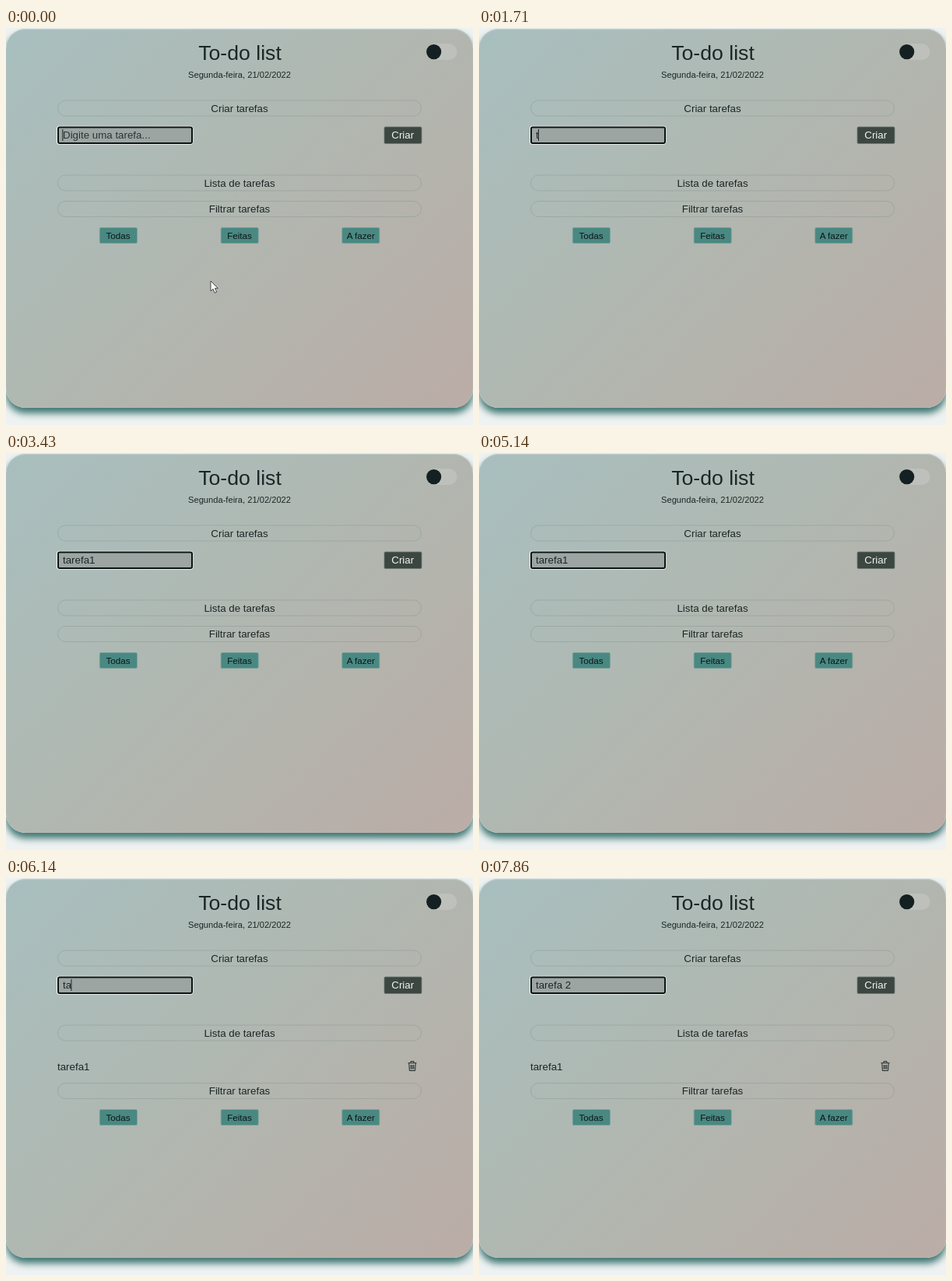
Recreate the animation shown at these times as an HTML page. Size 600 by 510 pixels, loop 8000 ms.

```html
<!DOCTYPE html>
<html lang="pt">
<head>
<meta charset="utf-8">
<title>To-do list</title>
<style>
  html, body { margin: 0; width: 100%; height: 100%; overflow: hidden; background: #eef2f2; }
  .card {
    position: absolute; left: 0; top: 1px; width: 600px; height: 487px; border-radius: 25px;
    background: linear-gradient(135deg, #a8bfbf 0%, #b1b7b0 50%, #bbaca6 100%);
    box-shadow: 0 7px 10px #3d7571, inset 0 1px 1px #c3d2d1;
  }
  svg { position: absolute; left: 0; top: 0; }
  text { font: 13.333px "Liberation Sans", Arial, sans-serif; fill: #1c2626; white-space: pre; }
  .mid { text-anchor: middle; }
  .pill { fill: none; stroke: #788784; stroke-opacity: .34; }
  .filter rect { fill: #4a8882; stroke: #75a09b; stroke-width: .8; }
  .filter text { font-size: 11.667px; fill: #0b1717; }
</style>
</head>
<body>
<div class="card"></div>
<svg width="600" height="510" viewBox="0 0 600 510">
  <text class="mid" x="300.5" y="41" style="font-size:26.667px">To-do list</text>
  <text class="mid" x="300" y="64" style="font-size:11.15px">Segunda-feira, 21/02/2022</text>

  <rect x="540" y="20" width="39.5" height="21" rx="10.5" fill="#bec0bb"/>
  <circle cx="549.7" cy="30.6" r="9.6" fill="#142022"/>

  <rect class="pill" x="66.5" y="93" width="467" height="20" rx="10"/>
  <text class="mid" x="300" y="107.5">Criar tarefas</text>

  <rect x="65" y="125.7" width="175.5" height="24" rx="3.5" fill="#f4f6f6"/>
  <rect x="67" y="127.5" width="172" height="20.5" rx="2" fill="#9ca5a2" stroke="#0d1414" stroke-width="2"/>
  <text id="field" x="73" y="142"></text>
  <rect id="caret" y="130" width="1" height="15" fill="#1c2626"/>
  <rect x="486" y="127" width="48" height="21.5" rx="1.5" fill="#3c4742" stroke="#6e7c77" stroke-width=".8"/>
  <text class="mid" x="509.7" y="142" style="fill:#f0f2f1">Criar</text>

  <rect class="pill" x="66.5" y="189" width="467" height="20" rx="10"/>
  <text class="mid" x="300" y="203.5">Lista de tarefas</text>

  <g id="item">
    <text x="66" y="247">tarefa1</text>
    <path d="M516.5 237.7H527.5M520 237.2V235.6H524V237.2M517.8 238.2L518.4 247.5H525.6L526.2 238.2M520.2 240V245.7M522 240V245.7M523.8 240V245.7" fill="none" stroke="#1c2626" stroke-width="1"/>
  </g>

  <g id="lower">
    <rect class="pill" x="66.5" y="222.5" width="467" height="20" rx="10"/>
    <text class="mid" x="300" y="237">Filtrar tarefas</text>
    <g class="filter">
      <rect x="120.4" y="256.5" width="48" height="20" rx="1.5"/>
      <text class="mid" x="144" y="271">Todas</text>
      <rect x="276.2" y="256.5" width="48" height="20" rx="1.5"/>
      <text class="mid" x="300" y="271">Feitas</text>
      <rect x="431.8" y="256.5" width="48" height="20" rx="1.5"/>
      <text class="mid" x="455.8" y="271">A fazer</text>
    </g>
  </g>

  <path id="pointer" d="M0 0V13L3 10.2L5.2 15.3L7.6 14.2L5.4 9.3H9.3Z" fill="#fff" stroke="#303838" stroke-width=".9"/>
</svg>
<script>
const LOOP = 8000, ADDED = 5430;
const $ = id => document.getElementById(id);
const field = $("field"), caret = $("caret"), pointer = $("pointer");

// [time, value]: each value holds until the next entry
const typed = [
  [0, ""],
  [1710, "t"], [1860, "ta"], [2000, "tar"], [2140, "taref"], [2290, "tarefa"], [3000, "tarefa1"],
  [ADDED, ""],
  [5860, "t"], [6140, "ta"], [6290, "tar"], [6430, "taref"], [6570, "tarefa"],
  [7290, "tarefa "], [7430, "tarefa 2"]
];
// the caret toggles at these times, starting visible
const blinks = [140, 570, 1000, 1430, 2710, 3000, 3430, 3860, 4290, 4710, 5140, 5570, 7000, 7290, 7860];

function draw(t) {
  const value = typed.filter(([start]) => t >= start).pop()[1];
  field.textContent = value;
  const end = value ? field.getComputedTextLength() : 0;
  if (!value) field.textContent = "Digite uma tarefa...";
  field.style.fill = value ? "#1c2626" : "#2a3433";
  caret.setAttribute("x", 72.3 + end);
  caret.style.display = blinks.filter(b => t >= b).length % 2 ? "none" : "";

  const added = t >= ADDED;
  $("item").style.display = added ? "" : "none";
  $("lower").setAttribute("transform", `translate(0 ${added ? 41 : 0})`);

  // the pointer slides off the right edge
  const p = Math.max(0, (t - 100) / 470);
  pointer.style.display = p < 1 ? "" : "none";
  pointer.setAttribute("transform", `translate(${263 + 337 * p} ${325 + 130 * p})`);
}

function tick(now) {
  draw(now % LOOP);
  requestAnimationFrame(tick);
}
draw(0);
requestAnimationFrame(tick);
</script>
</body>
</html>
```
